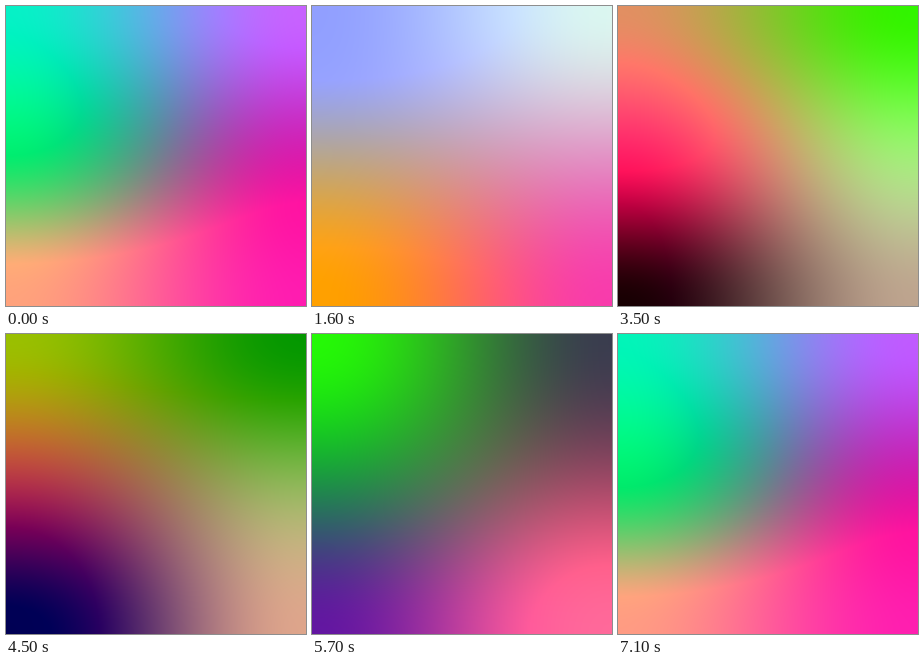
An HTML page with a canvas for the animation above (7.2 s loop, 300 by 300 pixels).

```html
<!DOCTYPE html>
<html lang="en">
<head>
<meta charset="utf-8">
<title>Drifting colour field</title>
<style>
html, body { margin: 0; width: 100%; height: 100%; overflow: hidden; }
canvas { display: block; width: 100vw; height: 100vh; }
</style>
</head>
<body>
<canvas id="stage" width="300" height="300"></canvas>
<script>
const SIZE = 300, LOOP = 7200, STEP = 100, CONTRAST = 1.1;

// Each channel is a still slope plus two slopes that swing a quarter turn apart.
// x and y run from -1 to 1; c and s are the cosine and sine of the loop angle.
const red = (x, y, c, s) =>
  158 + 24 * x + 40 * y + 21 * x * y +
  c * (x * (75 - 50 * y * y) + 53 * y - 60 * x * y + 87 * y * y - 47) +
  s * (49 - 18 * x - 13 * y - 34 * x * y);

const green = (x, y, c, s) =>
  132 - 44 * y + 12 * x * y +
  c * (x * (32 * y * y - 95) + 10 * y - 10 * x * y) +
  s * (22 + 8 * x - 54 * x * y);

const blue = (x, y, c, s) =>
  124 + 18 * x - 10 * y + 24 * x * y +
  c * (17 + 10 * x - 28 * y - 28 * x * y + 45 * y * y) +
  s * (39 + 6 * x - 72 * y + 36 * x * y);

const ctx = document.getElementById("stage").getContext("2d");
const image = ctx.createImageData(SIZE, SIZE);
const px = image.data.fill(255);

// Eased coordinate: steep in the middle, flat towards the edges.
const axis = Array.from({ length: SIZE }, (_, i) =>
  Math.sin(Math.PI * ((i + 0.5) / SIZE - 0.5)));

const boost = v => 128 + (v - 128) * CONTRAST;

function draw(t) {
  const angle = t / LOOP * 2 * Math.PI;
  const c = Math.cos(angle), s = Math.sin(angle);
  let at = 0;
  for (const y of axis) {
    for (const x of axis) {
      px[at] = boost(red(x, y, c, s));
      px[at + 1] = boost(green(x, y, c, s));
      px[at + 2] = boost(blue(x, y, c, s));
      at += 4;
    }
  }
  ctx.putImageData(image, 0, 0);
}

const start = performance.now();
let shown = -1;
function tick() {
  const t = Math.floor((performance.now() - start) % LOOP / STEP) * STEP;
  if (t !== shown) draw(shown = t);
  requestAnimationFrame(tick);
}
tick();
</script>
</body>
</html>
```
